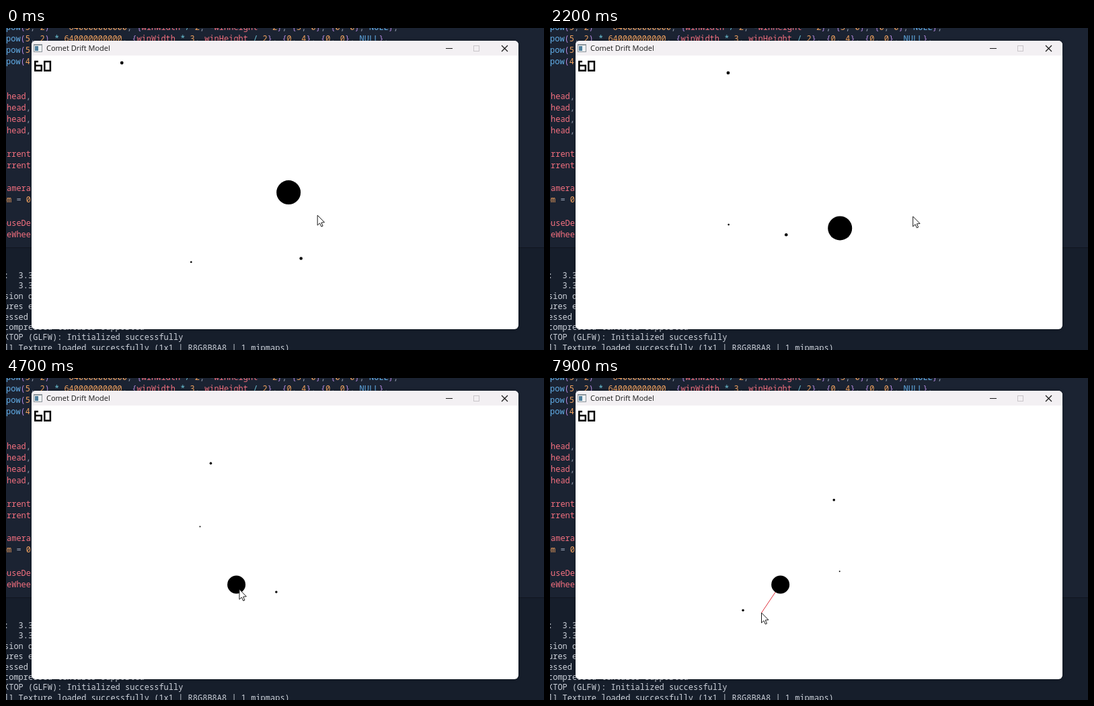
Recreate the animation shown at these times as an HTML page with a canvas. Size 800 by 480 pixels, loop 8 s.

```html
<!DOCTYPE html>
<html lang="en">
<head>
<meta charset="utf-8">
<title>Comet Drift Model</title>
<style>
  html, body { margin: 0; width: 800px; height: 480px; overflow: hidden; background: #1b2332; }
  canvas { display: block; }
</style>
</head>
<body>
<canvas id="stage" width="800" height="480"></canvas>
<script>
const ctx = document.getElementById('stage').getContext('2d');
const LOOP = 8000, ZOOM_AT = 3100, AIM_AT = 6900;
const CENTRE = [400, 245], SUN = [420, 245];
const INK = '#1a1a1a';

const code = `pow(5, 2)  * 640000000000, {winWidth / 2, -winHeight * 2}, {5, 0}, {0, 0}, NULL},
pow(5, 2) * 640000000000, {winWidth * 3, winHeight / 2}, {0, 4}, {0, 0}, NULL},
pow(5, 2)
pow(4, 2)


head,
head,
head,
head,

urrent
urrent

camera
om = 0

ouseDe
seWhee`.split('\n');

const log = `:  3.3
   3.3
sion d
ures e
essed
compressed textures supported
KTOP (GLFW): Initialized successfully
l] Texture loaded successfully (1x1 | R8G8B8A8 | 1 mipmaps)`.split('\n');

// Ellipse size, eccentricity, tilt in degrees, time of closest approach in ms
const planets = [
  { r: 2.4, size: 274.5, ecc: 0.335, tilt: -10, closest: 10420 },
  { r: 2.3, size: 82, ecc: 0.23, tilt: 272, closest: 3455 },
  { r: 1.3, size: 148, ecc: 0.207, tilt: 316.3, closest: 7050 }
];

// [ms, x, y]
const mousePath = [
  [0, 463, 279], [200, 496.5, 302.5], [700, 606, 270], [1500, 599.5, 270], [1850, 562, 251],
  [2700, 508, 323.5], [2850, 508, 323.5], [3300, 482, 289], [3500, 469, 294], [3620, 425, 280],
  [4700, 347, 315], [5000, 350, 351], [5500, 340, 312], [AIM_AT, 337, 308], [7500, 314.5, 350]
];

function mouseAt(t) {
  const i = mousePath.findIndex(key => key[0] > t);
  if (i < 0) return mousePath.at(-1).slice(1);
  const a = mousePath[i - 1], b = mousePath[i], u = (t - a[0]) / (b[0] - a[0]);
  return [1, 2].map(k => a[k] + (b[k] - a[k]) * u);
}

// How far a drag between two times has moved the view
function pan(t, from, to) {
  const a = mouseAt(from), b = mouseAt(Math.min(Math.max(t, from), to));
  return [b[0] - a[0], b[1] - a[1]];
}

function sunAt(t, zoom) {
  const first = pan(t, 0, 200), second = pan(t, 1850, 2700), third = pan(t, 3300, 3620);
  return CENTRE.map((c, k) => c + (SUN[k] + first[k] + second[k] - c) * zoom + third[k]);
}

// Kepler orbit around the sun
function orbitAt(t, { size, ecc, tilt, closest }) {
  const period = 8.39 * size ** 1.5, mean = 2 * Math.PI * (t - closest) / period;
  let e = mean;
  for (let n = 0; n < 12; n++) e = mean + ecc * Math.sin(e);
  const x = size * (Math.cos(e) - ecc), y = size * Math.sqrt(1 - ecc * ecc) * Math.sin(e);
  const c = Math.cos(tilt * Math.PI / 180), s = Math.sin(tilt * Math.PI / 180);
  return [x * c - y * s, x * s + y * c];
}

function rect(colour, x, y, w, h) {
  ctx.fillStyle = colour;
  ctx.fillRect(x, y, w, h);
}

function text(str, x, y, colour) {
  ctx.fillStyle = colour;
  ctx.fillText(str, x, y);
}

function disc(x, y, r) {
  ctx.fillStyle = '#000';
  ctx.beginPath();
  ctx.arc(x, y, r, 0, 2 * Math.PI);
  ctx.fill();
}

function line(colour, width, ...points) {
  ctx.strokeStyle = colour;
  ctx.lineWidth = width;
  ctx.beginPath();
  points.forEach(p => ctx.lineTo(...p));
  ctx.stroke();
}

function panel(colour, height, radii) {
  ctx.fillStyle = colour;
  ctx.beginPath();
  ctx.roundRect(38, 19, 724, height, radii);
  ctx.fill();
}

function tokenColour(token) {
  if (/^(pow|NULL)$/.test(token)) return '#62aee8';
  if (/^(\d|om)/.test(token)) return '#f2a35f';
  if (/^[a-z]/i.test(token)) return '#f4707f';
  if (/[{}()]/.test(token)) return '#b58be0';
  return /[*\/-]/.test(token) ? '#6cc5d8' : '#8e98aa';
}

function drawEditor() {
  rect('#1b2332', 0, 0, 800, 327);
  rect('#161e2b', 0, 327, 800, 153);
  rect('#10151f', 0, 327, 800, 1);
  ctx.font = '12px "Noto Sans Mono", "DejaVu Sans Mono", monospace';
  const step = ctx.measureText('0').width;
  code.forEach((str, row) => {
    // Cut-off lines end at the window's edge
    const x = str.startsWith('pow') ? 0 : 37 - str.length * step;
    for (const m of str.matchAll(/\w+|[^\w\s]/g))
      text(m[0], x + m.index * step, 3 + row * 17.15, tokenColour(m[0]));
  });
  log.forEach((str, row) => text(str, -3, 373 + row * 15.4, '#cdd2da'));
}

function drawWindow() {
  ctx.save();
  ctx.shadowColor = 'rgba(0,0,0,.3)';
  ctx.shadowBlur = 5;
  panel('#fff', 430, 6);
  ctx.restore();
  panel('#f3f0f3', 22, [6, 6, 0, 0]);

  rect('#8d959b', 41, 24, 13, 12);
  rect('#eef1f3', 42, 26, 11, 9);
  rect('#4f7f9d', 43, 27, 5, 7);
  ctx.font = '11px "Open Sans", "Noto Sans", sans-serif';
  text('Comet Drift Model', 60, 34, INK);
  rect(INK, 654, 30, 10, 1);
  ctx.lineWidth = 1;
  ctx.strokeStyle = '#c8c4c8';
  ctx.strokeRect(695.5, 26.5, 8, 8);
  line(INK, 1.2, [737, 26], [746, 35]);
  line(INK, 1.2, [746, 26], [737, 35]);
}

// Blocky frame-rate digits "60"
function drawCounter() {
  line('#000', 2.5, [48, 50], [43.3, 50], [43.3, 63.5], [52.8, 63.5], [52.8, 56], [43.3, 56]);
  ctx.lineWidth = 2.5;
  ctx.strokeRect(57.3, 50, 8.6, 13.5);
}

function drawPointer(x, y) {
  ctx.beginPath();
  [[0, 0], [0, 15], [3.4, 11.8], [5.8, 17], [8, 16], [5.7, 11], [10.4, 10.6]]
    .forEach(([dx, dy]) => ctx.lineTo(x + dx, y + dy));
  ctx.closePath();
  ctx.fillStyle = '#fff';
  ctx.fill();
  ctx.strokeStyle = INK;
  ctx.lineWidth = 1;
  ctx.stroke();
}

function draw(t) {
  const zoom = t < ZOOM_AT ? 1 : 0.75;
  const sun = sunAt(t, zoom), mouse = mouseAt(t);
  drawEditor();
  drawWindow();

  ctx.save();
  ctx.beginPath();
  ctx.rect(38, 41, 724, 408);
  ctx.clip();
  if (t >= AIM_AT) line('#e0303c', 1, sun, mouse);
  disc(...sun, 18 * zoom);
  for (const planet of planets) {
    const [x, y] = orbitAt(t, planet);
    disc(sun[0] + x * zoom, sun[1] + y * zoom, planet.r * zoom);
  }
  drawCounter();
  ctx.restore();
  drawPointer(...mouse);
}

const start = performance.now();
function tick() {
  draw((performance.now() - start) % LOOP);
  requestAnimationFrame(tick);
}
tick();
</script>
</body>
</html>
```
